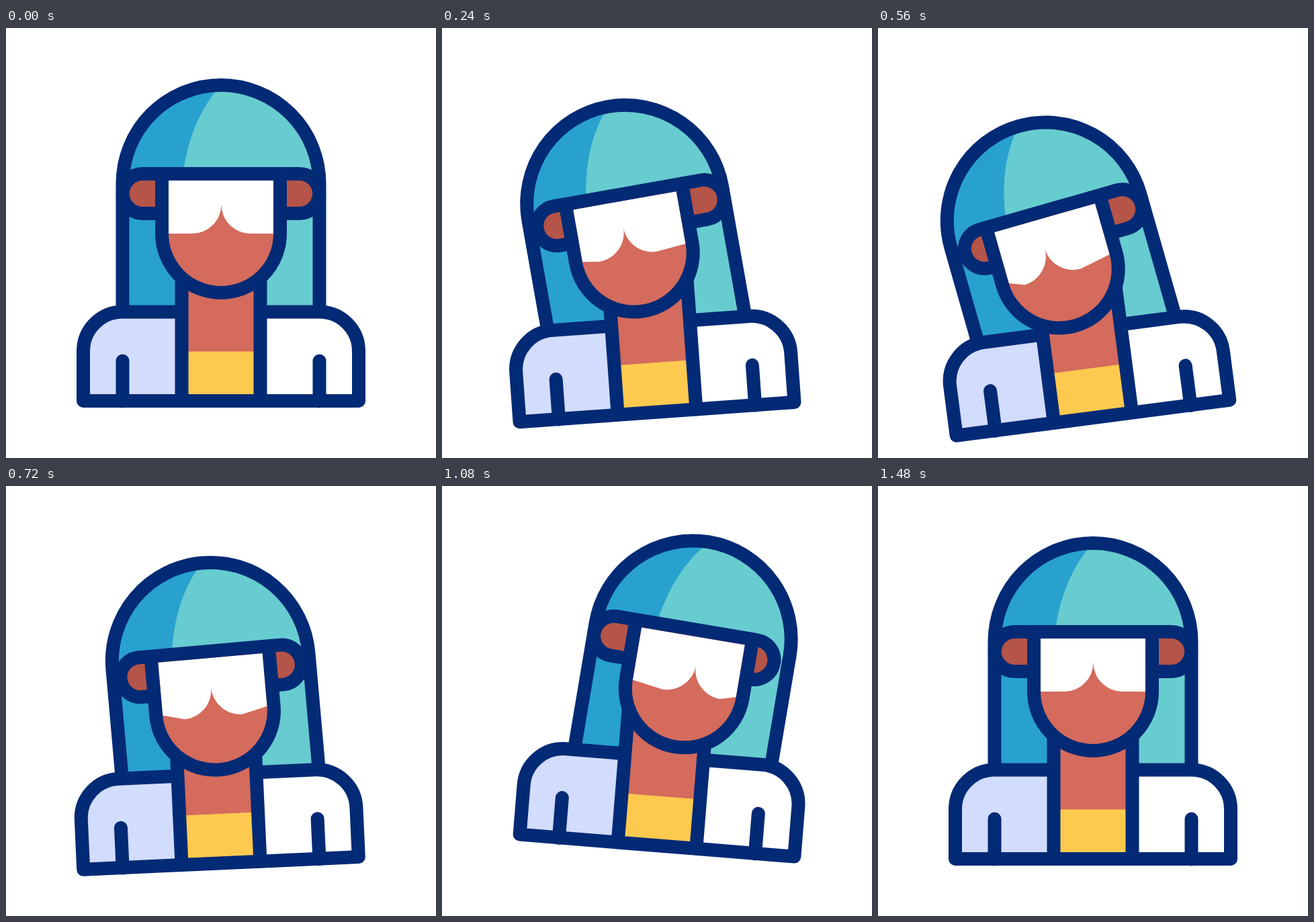
Write an HTML page that moves like this. It is 640 px wide and 640 px high and loops after 1.7 s.

```html
<!DOCTYPE html>
<html lang="en">
<head>
<meta charset="utf-8">
<title>Swaying avatar</title>
<style>
  html, body { margin: 0; height: 100%; overflow: hidden; background: #fff; }
  svg { display: block; width: 100vw; height: 100vh; }
  .line { fill: none; stroke: #032a75; stroke-width: 20; stroke-linejoin: round; }
  .round { stroke-linecap: round; }
</style>
</head>
<body>
<svg viewBox="0 0 640 640">
  <g class="head">
    <path fill="#67ccd0" d="M173.5 436V231.500A146.500 146.500 0 0 1 466.500 231.500V436Z"/>
    <path fill="#28a1ce" d="M173.500 436V231.500A146.500 146.500 0 0 1 320 85Q276 133 264 212L320 300V436Z"/>
    <path class="line" d="M173.500 436V231.500A146.500 146.500 0 0 1 466.500 231.500V436"/>
  </g>
  <g id="body">
    <path fill="#d46b5c" d="M261.500 340H378.500V482H261.500Z"/>
    <path fill="#fdca4f" d="M261.500 481.500H378.500V555H261.500Z"/>
    <path class="line" style="fill:#d2dcfd" d="M261.500 555H115V481A58.500 58.500 0 0 1 173.500 422.500H261.500"/>
    <path class="line" style="fill:#fff" d="M378.500 555H525V481A58.500 58.500 0 0 0 466.500 422.500H378.500"/>
    <path class="line" d="M261.500 340V555H378.500V340"/>
    <path class="line round" d="M173.500 495.500V555.500M466.500 495.500V555.500"/>
  </g>
  <g class="head">
    <path id="leftEar" class="line" style="fill:#b55448"/>
    <path id="rightEar" class="line" style="fill:#b55448"/>
    <path fill="#d46b5c" d="M232 217V306A88 88 0 0 0 408 306V217Z"/>
    <path id="lenses" fill="#fff"/>
    <path class="line" d="M232 217V306A88 88 0 0 0 408 306V217Z"/>
  </g>
</svg>
<script>
const LOOP = 1700;
const times = [0, 240, 480, 560, 720, 920, 990, 1240, 1480];

// Cubic spline that comes to rest at every turning point
function track(...v) {
  const n = v.length, m = v.map(() => 0);
  const h = i => times[i + 1] - times[i];
  const rate = i => (v[i + 1] - v[i]) / h(i);
  for (let pass = 0; pass < 40; pass++) {
    for (let i = 1; i < n - 1; i++) {
      const a = rate(i - 1), b = rate(i), p = 1 / h(i - 1), q = 1 / h(i);
      if (a * b > 0) m[i] = (3 * (a * p + b * q) - m[i - 1] * p - m[i + 1] * q) / (2 * (p + q));
    }
  }
  return t => {
    if (t >= times[n - 1]) return v[n - 1];
    let i = 0;
    while (t >= times[i + 1]) i++;
    const d = h(i), u = (t - times[i]) / d, w = 1 - u;
    return w * w * ((1 + 2 * u) * v[i] + u * d * m[i]) + u * u * ((3 - 2 * u) * v[i + 1] - w * d * m[i + 1]);
  };
}

const bodyTurn = track(0, -4.07, -8.9, -7.44, -2.66, 3.9, 5, 2.65, 0);
const bodyY = track(555, 571.5, 584, 580.3, 561.5, 538, 533.5, 543.5, 555);
const headTurn = track(0, -10, -19.7, -16, -5.13, 9.2, 10.5, 5.16, 0);
const headX = track(320, 273, 234, 249, 304, 371, 379, 347, 320);
const headY = track(231.5, 261, 293, 287, 260.5, 237, 232, 225.7, 231.5);
const leftEarX = track(0, 10.5, 21, 18, 10.6, 1.5, 0, 0, 0);
const rightEarX = track(0, 0, 0, -2, -11.5, -22.7, -23.5, -10.5, 0);
const lensX = track(0, -9.5, -15.5, -13, -3.3, 10.3, 11.5, 6.3, 0);
const lensY = track(0, 4, 8.6, 8.6, 8.6, 7.5, 7.2, 4.4, 0);

const byId = id => document.getElementById(id);
const heads = document.querySelectorAll('.head');
const place = (el, x, y, turn, px, py) =>
  el.setAttribute('transform', `translate(${x} ${y}) rotate(${turn}) translate(${-px} ${-py})`);
const ear = (edge, x, sweep) => `M${edge} 217H${x}A29.5 29.5 0 0 ${sweep} ${x} 276H${edge}`;

function draw() {
  const t = performance.now() % LOOP;
  place(byId('body'), 320, bodyY(t), bodyTurn(t), 320, 555);
  for (const head of heads) place(head, headX(t), headY(t), headTurn(t), 320, 231.5);
  byId('leftEar').setAttribute('d', ear(232, 203.3 + leftEarX(t), 0));
  byId('rightEar').setAttribute('d', ear(408, 436.7 + rightEarX(t), 1));
  const x = lensX(t), y = 306 + lensY(t), r = 43.5;
  byId('lenses').setAttribute('d', `M242 227H398V306L${364 + x} ${y}` +
    `a${r} ${r} 0 0 1 ${-r} ${-r}a${r} ${r} 0 0 1 ${-r} ${r}L242 306Z`);
  requestAnimationFrame(draw);
}
draw();
</script>
</body>
</html>
```
